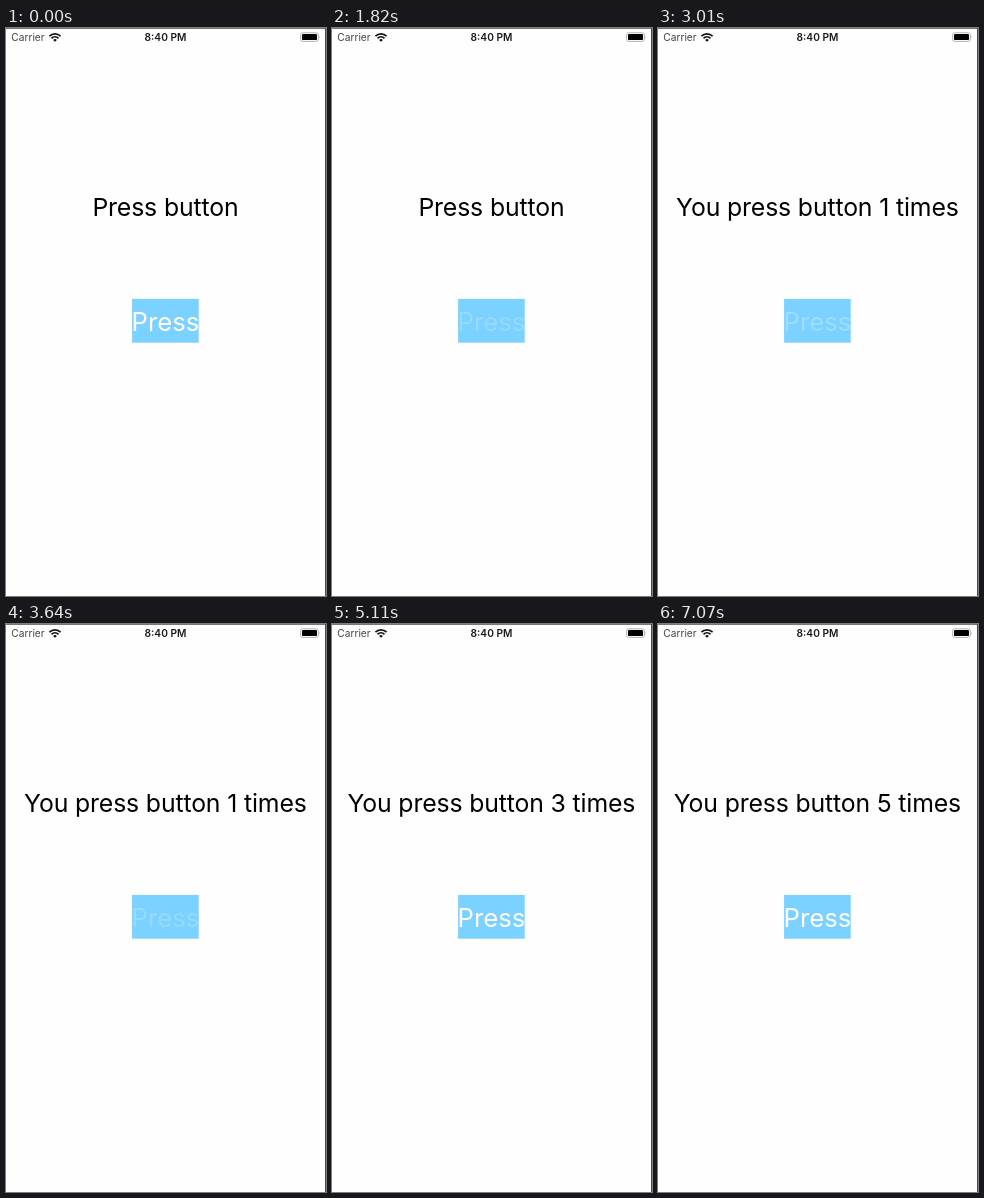
Animation of 320x568 px, one loop 7210 ms. Source, as an HTML page:

```html
<!DOCTYPE html>
<html lang="en">
<head>
<meta charset="utf-8">
<title>Press button</title>
<style>
  html, body { margin: 0; width: 100%; height: 100%; overflow: hidden; background: #fefefe; }
  svg { display: block; width: 320px; height: 568px; }
  text {
    font-family: Inter, "Noto Sans", sans-serif;
    font-variation-settings: "opsz" 14;
    white-space: pre;
  }
  .status { font-size: 10.2px; }
  #label { font-size: 24.8px; letter-spacing: -0.14px; text-anchor: middle; }
  #title { font-size: 25.7px; text-anchor: middle; fill: #fff; }
</style>
</head>
<body>
<svg viewBox="0 0 320 568">
  <rect width="320" height="568" fill="#fefefe"/>
  <rect width="320" height="1" fill="#777"/>
  <rect x="319" width="1" height="568" fill="#4a4a4a"/>

  <text class="status" x="5.3" y="13" fill="#444">Carrier</text>
  <g fill="none" stroke="#111" stroke-width="1.7">
    <path d="M43.4 8.2A8 8 0 0 1 54.6 8.2"/>
    <path d="M45.5 10.3A5 5 0 0 1 52.5 10.3"/>
    <path d="M49 13.8L47.1 11.9A2.7 2.7 0 0 1 50.9 11.9Z" fill="#111" stroke="none"/>
  </g>
  <text class="status" x="159.5" y="13" text-anchor="middle" font-weight="600" fill="#1a1a1a">8:40 PM</text>
  <rect x="294.6" y="4.8" width="17.8" height="8.6" rx="2.3" fill="none" stroke="#aaa" stroke-width=".9"/>
  <rect x="296" y="6.1" width="15" height="6" rx="1.2" fill="#000"/>
  <path d="M313.3 7.7Q314.6 9.1 313.3 10.5Z" fill="#aaa"/>

  <text id="label" x="159.4" y="188.4"></text>
  <rect x="126.1" y="270.9" width="66.6" height="43.8" fill="#7bd1ff"/>
  <text id="title" x="159.4" y="303">Press</text>
</svg>
<script>
const LOOP = 7210, STEP = 70, DIM = 0.2;
const label = document.getElementById("label");
const title = document.getElementById("title");

// Touch down, touch up and end of the title's fade, in ms.
const presses = [
  { down: 1820, up: 1960, end: 2310 },
  { down: 2730, up: 3010, end: 3360, soft: true },
  { down: 3640, up: 3850, end: 4200 },
  { down: 4480, up: 4690, end: 4970 },
  { down: 5320, up: 5530, end: 5880 },
  { down: 6230, up: 6440, end: 6720 },
];

const ease = p => p * p * (3 - 2 * p);

function titleAlpha(t) {
  const press = presses.find(p => t >= p.down && t < p.end);
  if (!press) return 1;
  if (t < press.up) return press.soft && t < press.down + STEP ? 0.5 : DIM;
  const progress = (t - press.up + STEP) / (press.end - press.up + STEP);
  return DIM + (1 - DIM) * ease(progress);
}

function draw(now) {
  const t = Math.floor((now % LOOP) / STEP) * STEP;
  const count = presses.filter(p => t >= p.up).length;
  const words = count ? `You press button ${count - 1} times` : "Press button";
  if (label.textContent !== words) label.textContent = words;
  title.setAttribute("fill-opacity", titleAlpha(t).toFixed(3));
}

const start = performance.now();
function tick() {
  draw(performance.now() - start);
  requestAnimationFrame(tick);
}
tick();
</script>
</body>
</html>
```
